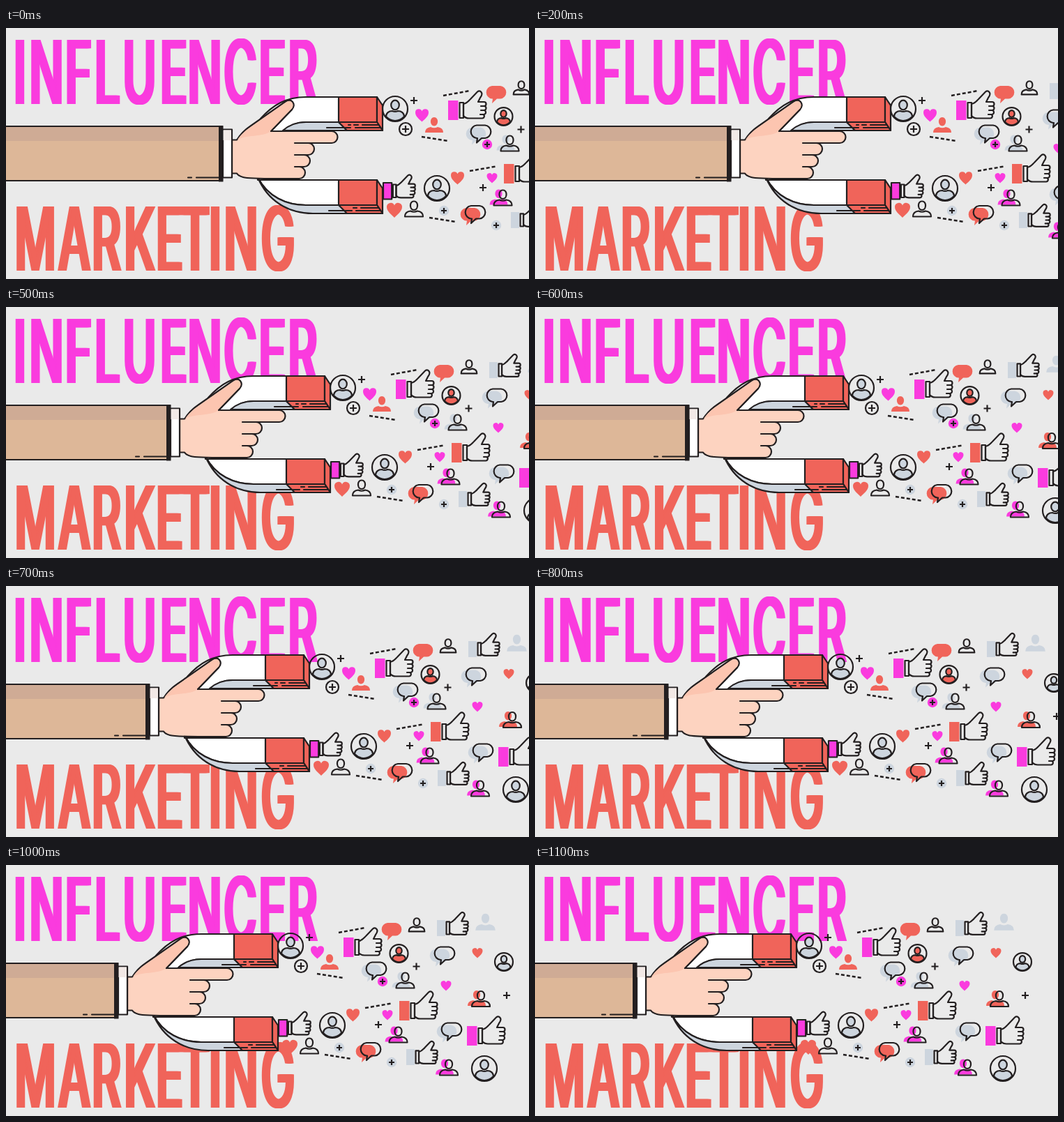
An HTML page that plays this animation: 750x360 px, repeating every 1.2 s.

```html
<!DOCTYPE html>
<html lang="en">
<head>
<meta charset="utf-8">
<title>Influencer marketing</title>
<style>
  html, body { margin: 0; width: 100%; height: 100%; overflow: hidden; background: #eaeaea; }
  svg { display: block; width: 750px; height: 360px; }
  text { font: 500 127px Inter, "Liberation Sans", sans-serif; text-anchor: middle; }
  .line { stroke: #231f20; stroke-width: 2.2; stroke-linejoin: round; stroke-linecap: round; }
  .line * { vector-effect: non-scaling-stroke; }
</style>
</head>
<body>
<svg viewBox="0 0 750 360">
  <g id="title"></g>
  <g id="scene" class="line" fill="none">
    <g id="icons"></g>
    <g id="magnet"></g>
    <g id="arm">
      <path fill="#fdd3c0" d="M324 160.5H331C336 153 341 147 350 141L400 106Q407 101 411 106T410 117L380 148H467A8.5 8.5 0 0 1 467 165H433.5A8.5 8.5 0 0 1 433.5 182H427.5A8.5 8.5 0 0 1 427.5 199H420.5A8.5 8.5 0 0 1 420.5 216C390 216 350 217 340 214Q333 212 331 208.5H324Z"/>
      <path fill="#fcc5b0" stroke="none" d="M332 160C337 153 342 148 351 142L401 107Q407 103 410 107T409 117L379 148Q376 153 352 155Q340 156 332 160Z"/>
      <path d="M380 148L410 117M380 148H467M414 165H434M414 182H428M414 199H421"/>
      <path fill="#fff" d="M311 145.5H324V214.5H311Z"/>
      <path fill="#f2e9e6" stroke="none" d="M311 146.5H323V161H311Z"/>
      <path fill="#ddb798" d="M-9 141H310V219H-9Z"/>
      <path fill="#cfab95" stroke="none" d="M-9 142H306V162H-9Z"/>
      <path fill="#231f20" stroke="none" d="M305 140H311.5V220.5H305Z"/>
      <path d="M261 214.5H266M273 214.5H306"/>
    </g>
  </g>
</svg>
<script>
const PINK = '#fa3bde', CORAL = '#f0645a', GREY = '#cdd5de', INK = '#231f20';
const $ = id => document.getElementById(id);

// Condensed lettering: narrow text, repeated sideways for heavier stems.
const SQUEEZE = .51;
const word = (id, letters, centres, y, color) =>
  `<g transform="scale(${SQUEEZE} 1)" fill="${color}">
    <text id="${id}" x="${centres.map(c => c / SQUEEZE).join(' ')}" y="${y}">${letters}</text>` +
  [-5, -2.5, 2.5, 5].map(d => `<use href="#${id}" x="${d}"/>`).join('') + '</g>';

$('title').innerHTML =
  word('top', 'INFLUENCER', [20, 58, 104, 145.3, 191.5, 240.5, 285, 336, 382, 425.5], 109, PINK) +
  word('bottom', 'MARKETING', [42, 98, 144, 191.5, 234.5, 271, 300, 337, 390], 348, CORAL);

const path = (d, fill = 'none', extra = '') => `<path d="${d}" fill="${fill}" ${extra}/>`;
const flat = (d, fill) => path(d, fill, 'stroke="none"');
const at = (x, y, s, body) => `<g transform="translate(${x} ${y}) scale(${s})">${body}</g>`;

const tip = y => at(0, y, 1,
  path('M477 0H532V36H477Z', CORAL) +
  path('M532 0L540 12V48L532 36Z', CORAL) +
  path('M477 36H532L540 48H489Z', CORAL));

$('magnet').innerHTML =
  path('M532 99H430C402 99 383 110 365 130V150H397C405 140 416 135 430 135H532Z', '#fff') +
  path('M397 147C405 140 416 135 430 135H477L489 147Z', GREY) +
  path('M361 214C375 242 402 254 430 254H532V218H361Z', '#fff') +
  path('M361 214C375 248 405 266 440 266H540L532 254H430C402 254 375 242 361 214Z', GREY) +
  tip(99) + tip(218) +
  path('M460 143H494M501 143H537M491 139H494M499 139H505M511 139H534') +
  path('M463 262H496M502 262H537M498 258H503M509 258H534');

const HEAD = 'M0 -13.5C7 -13.5 6.5 -1 0 -1S-7 -13.5 0 -13.5Z';
const BODY = 'M-13 8.5Q-13 1.5 -5 .5Q0 3 5 .5Q13 1.5 13 8.5Z';
const BUBBLE = 'M-6 -9.5H6A9.3 9.3 0 0 1 6 9H1L-6 15.5L-5 9H-6A9.3 9.3 0 0 1 -6 -9.5Z';
const HEART = 'M0 10C-4 6 -10 2 -10 -4A5.2 5.2 0 0 1 0 -6A5.2 5.2 0 0 1 10 -4C10 2 4 6 0 10Z';

const heart = (x, y, w, color) => at(x, y, w / 20, flat(HEART, color));
const plus = (x, y, r = 5) => path(`M${x - r} ${y}h${2 * r}M${x} ${y - r}v${2 * r}`, 'none', 'stroke-linecap="butt"');
const badge = (x, y, color) => (color
  ? `<circle cx="${x}" cy="${y}" r="7.2" fill="${color}" stroke="none"/>`
  : `<circle cx="${x}" cy="${y}" r="9"/>`) + plus(x, y, color ? 4 : 5);
const dashes = (x, y, dx, dy) =>
  path(`M${x} ${y}l${dx} ${dy}`, 'none', 'stroke-width="2.5" stroke-linecap="butt" stroke-dasharray="5 3"');

const solidPerson = (x, y, color, s = 1) => at(x, y, s, flat(HEAD, color) + flat(BODY, color));
const person = (x, y, shade, s = 1) =>
  (shade ? solidPerson(x - 6, y - 1, shade, s) : '') + at(x, y, s, path(HEAD) + path(BODY));

const solidBubble = (x, y, color) => at(x, y, 1, flat(BUBBLE, color));
const bubble = (x, y, shade) => solidBubble(x - 7, y + 3, shade) + at(x, y, 1, path(BUBBLE));

const avatar = (x, y, s = 1, color = GREY) => at(x, y, s,
  '<circle r="18"/>' +
  `<ellipse cy="-5.5" rx="5.8" ry="6.8" fill="${color}"/>` +
  path('M-13 11C-13 6 -9 3 -4 3Q0 5 4 3C9 3 13 6 13 11Q7 17 0 17T-13 11Z', color));

const thumb = (x, y, s, color, edge = 'none') => at(x, y, s,
  path('M0 0H14.5V28H0Z', color, `stroke="${edge}"`) +
  path('M16.5 3H22V25H16.5Z') +
  path('M22 5C27 4 29 1 32 -2L42 -12.5Q45 -15 47.5 -12T46 -4L43 2H51.5a3 3 0 0 1 0 6a3 3 0 0 1 0 6a3 3 0 0 1 -1 6a3 3 0 0 1 -1.5 5.5H30Q25 25.5 22 22Z') +
  path('M47 8h5M47 14h5M46 20h5'));

$('icons').innerHTML = [
  avatar(558, 116), plus(585, 104), heart(596.5, 125, 19, PINK), badge(573, 145),
  solidPerson(614, 141.5, CORAL), dashes(596, 156, 38, 6), dashes(627, 97, 38, -7),
  thumb(634, 104, 1, PINK), solidBubble(703, 92.5, CORAL), person(739, 88, null, .87),
  avatar(713.5, 127, .72, CORAL), bubble(681, 149, GREY), badge(690, 167, PINK),
  plus(738.5, 145.5), person(722.5, 168, GREY),

  thumb(541, 222, .84, PINK, INK), heart(557, 261, 22, CORAL), person(585, 262),
  avatar(618, 230), heart(647.5, 215, 19, CORAL), dashes(607, 272, 38, 6),
  badge(628, 262, GREY), dashes(665, 205, 38, -6.5), heart(697, 215, 15, PINK),
  plus(684, 229), person(712.5, 246, PINK), bubble(673, 264.5, CORAL), badge(703, 283, GREY),
  thumb(714, 195, 1, CORAL), thumb(724, 264, .82, GREY),

  thumb(768, 79, .82, GREY), heart(826, 126, 15, CORAL), solidPerson(837.5, 84.5, GREY, 1.1),
  bubble(779, 127, GREY), avatar(864, 139, .72), heart(781, 173, 15, PINK),
  person(831, 194.5, CORAL), plus(868, 187), bubble(789, 236, GREY),
  thumb(811, 231, 1, PINK), person(785, 293, PINK), avatar(836, 292)
].join('');

// The scene moves left in twelve hard steps per loop.
const start = performance.now();
function draw() {
  const step = Math.floor((performance.now() - start) / 100) % 12;
  $('scene').setAttribute('transform', `translate(${-15 * step} 0)`);
  requestAnimationFrame(draw);
}
draw();
</script>
</body>
</html>
```
